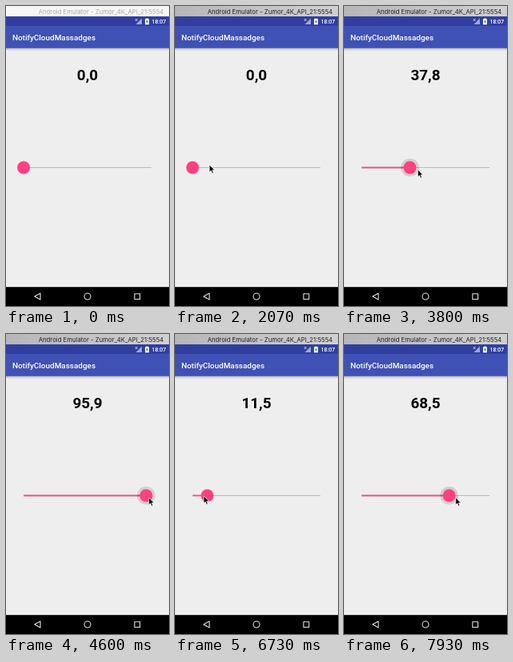
Write an HTML page that moves like this. It is 204 px wide and 376 px high and loops after 8000 ms.

```html
<!DOCTYPE html>
<html lang="en">
<head>
<meta charset="utf-8">
<title>Slider demo</title>
<style>
  html, body { margin: 0; width: 100%; height: 100%; overflow: hidden; background: #eee; }
  svg { display: block; width: 204px; height: 376px; }
  .ui { font-family: Roboto, sans-serif; font-weight: 500; fill: #fff; }
  #caption { font: 7.75px Inter, sans-serif; fill: #a9a9a9; }
  #bar { fill: #f6f6f6; }
  .active #caption { fill: #222; }
  .active #bar { fill: url(#chrome); }
  #value { font: 700 18.9px Roboto, sans-serif; text-anchor: middle; }
  .nav { fill: none; stroke: #e4e4e4; stroke-width: 1.1; stroke-linejoin: round; }
</style>
</head>
<body>
<svg id="stage" viewBox="0 0 204 376">
  <defs>
    <linearGradient id="chrome">
      <stop stop-color="#b6b6b6"/><stop offset="1" stop-color="#d0d0d0"/>
    </linearGradient>
    <linearGradient id="shade" x2="0" y2="1">
      <stop stop-opacity=".24"/><stop offset="1" stop-opacity="0"/>
    </linearGradient>
  </defs>
  <rect width="204" height="376" fill="#eee"/>

  <rect id="bar" width="204" height="13"/>
  <text id="caption" x="40.7" y="9.5">Android Emulator - Zumor_4K_API_21:5554</text>

  <rect y="13" width="204" height="12.2" fill="#303f9f"/>
  <path d="M162.5 23h7.5v-7.5z" fill="#fff" opacity=".55"/>
  <path d="M162 16.2l2.4 2.6m0-2.6l-2.4 2.6" stroke="#fff" stroke-width=".8"/>
  <path d="M174 16.3h1.4v-.9h2.2v.9h1.4v7h-5z" fill="#fff"/>
  <path d="M176.8 17.3l-1.6 2.8h1.1v2.2l1.6-2.9h-1.1z" fill="#303f9f"/>
  <text class="ui" x="182.5" y="22" font-size="7">18:07</text>

  <rect y="25" width="204" height="27.8" fill="#3f51b5"/>
  <rect y="52.8" width="204" height="3.5" fill="url(#shade)"/>
  <text class="ui" x="7.9" y="43.2" font-size="9.95">NotifyCloudMassadges</text>

  <text id="value" x="102" y="93.4">0,0</text>

  <path d="M22 202.5H182" stroke="#bababa"/>
  <path id="fill" stroke="#e8508a" stroke-width="1.8"/>
  <g id="thumb">
    <circle id="halo" r="11.3" fill-opacity=".13"/>
    <circle r="8" fill="#ff4081"/>
  </g>

  <rect y="352.2" width="204" height="24"/>
  <path class="nav" d="M43 360.1v7.8l-7.2-3.9z"/>
  <circle class="nav" cx="102" cy="364" r="4"/>
  <rect class="nav" x="160.9" y="360.7" width="6.8" height="6.8"/>

  <path id="cursor" d="M0 0V9.2L2.1 7.3L3.6 10.8L5.2 10.1L3.7 6.7H6.6Z" stroke="#fff" stroke-width=".7"/>
</svg>
<script>
  const $ = id => document.getElementById(id);
  const FPS = 15, TICKS = 120, ENTER = 19, FOCUS = 23, LEAD = 0.2;

  // Time in ticks, then strokes made so far: odd counts end right, even left.
  const strokes = [
    [45, 0], [57, 2.41], [69, 4.866], [83, 7.66], [95, 9], [100, 10], [106, 10], [119, 12.585]
  ];
  // Time in ticks, then x and y of the pointer between drags.
  const path = [
    [ENTER, 207, 182], [31, 43, 199], [35, 50, 199], [38, 50, 199], [42, 22, 203],
    [101, 36, 203], [106, 40, 205]
  ];

  function along(keys, t, col = 1) {
    const next = keys.findIndex(k => k[0] > t);
    const i = next < 0 ? keys.length - 1 : Math.max(next, 1);
    const a = keys[i - 1], b = keys[i];
    const u = Math.max(0, (t - a[0]) / (b[0] - a[0]));
    return a[col] + (b[col] - a[col]) * u;
  }

  // The thumb swings to the right end; each return falls a little shorter.
  function percent(t) {
    const n = along(strokes, t), low = 1.15 * n;
    return low + (100 - low) * (1 - Math.cos(Math.PI * n)) / 2;
  }

  const toX = p => 22 + p * 1.6;
  const isPressed = t => (t >= 45 && t <= 100) || t >= 106;
  const move = (id, x, y) => $(id).setAttribute('transform', `translate(${x} ${y})`);
  const show = (id, on) => { $(id).style.display = on ? '' : 'none'; };

  function draw(t) {
    const p = percent(t), x = toX(p), pressed = isPressed(t);
    $('stage').classList.toggle('active', t >= FOCUS);
    $('value').textContent = p.toFixed(1).replace('.', ',');
    $('fill').setAttribute('d', `M22 202.5H${x}`);
    move('thumb', x, 202.5);
    show('halo', pressed);
    show('cursor', t >= ENTER);
    if (pressed) move('cursor', toX(percent(t + LEAD)), 205);
    else move('cursor', along(path, t), along(path, t, 2));
  }

  // The screen refreshes in whole ticks.
  function tick() {
    draw(Math.floor((performance.now() + 5) * FPS / 1000) % TICKS);
    requestAnimationFrame(tick);
  }
  tick();
</script>
</body>
</html>
```
